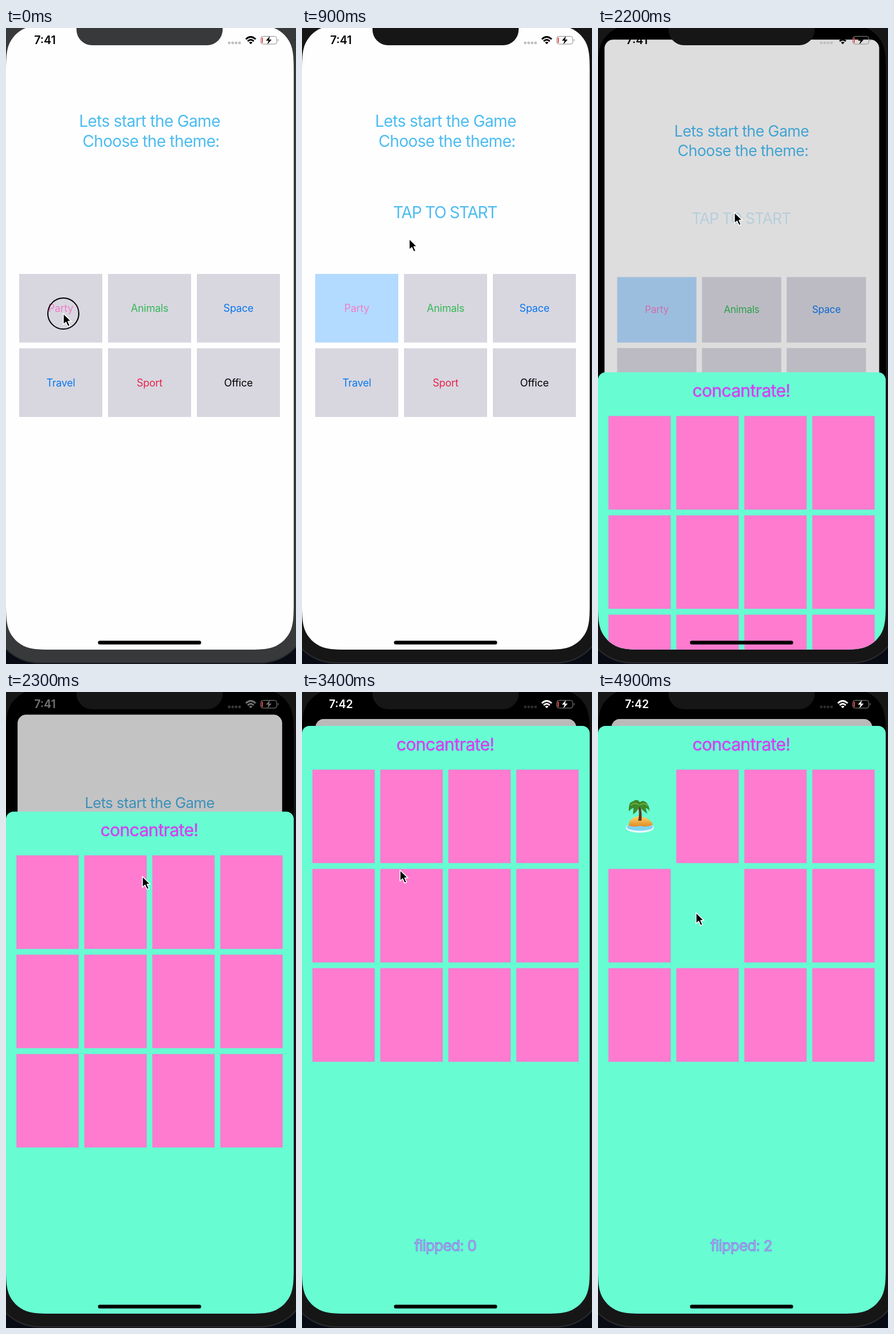
Recreate the animation shown at these times as an HTML page. Size 506x1107 px, loop 5 s.

```html
<!DOCTYPE html>
<html lang="en">
<head>
<meta charset="utf-8">
<title>Memory game</title>
<style>
html, body { margin: 0; width: 100%; height: 100%; overflow: hidden; background: #080b14; }
svg { display: block; width: 506px; height: 1107px; }
text { font-family: Inter, Roboto, sans-serif; text-anchor: middle; white-space: pre; }
.big { font-size: 28px; letter-spacing: -.024em; fill: #4bbcf0; }
.tap { letter-spacing: -.045em; }
.theme { font-size: 18px; letter-spacing: -.015em; }
.clock { font-size: 19.5px; font-weight: 600; }
.title { font-size: 30px; letter-spacing: -.022em; fill: #ee32f0; stroke: #9a6cf0; stroke-width: .6; }
.count { font-size: 26px; letter-spacing: -.032em; fill: #cfa3dc; stroke: #6f80ee; stroke-width: .9; }
</style>
</head>
<body>
<svg viewBox="0 0 506 1107">
  <defs>
    <clipPath id="screen"><path id="outline"/></clipPath>
    <linearGradient id="sand" x2="0" y2="1">
      <stop stop-color="#ffd76a"/><stop offset="1" stop-color="#e08a25"/>
    </linearGradient>
  </defs>
  <rect width="506" height="1107" fill="#080b14"/>
  <rect id="bezel" x="-24" y="-40" width="550" height="1145" rx="82" stroke="#2b2b2e" stroke-width="2"/>
  <g clip-path="url(#screen)">
    <rect y="-5" width="502" height="1087" fill="#000"/>
    <g id="home">
      <rect id="page" y="-5" width="502" height="1087" fill="#fffeff"/>
      <text class="big" x="250.5" y="172">Lets start the Game</text>
      <text class="big" x="253" y="207">Choose the theme:</text>
      <text class="big tap" id="tap" x="249.5" y="331">TAP TO START</text>
      <g id="themes"></g>
      <rect id="dim" y="-5" width="502" height="1087"/>
    </g>
    <g id="sheet">
      <rect width="502" height="1200" rx="13" fill="#68fcd3"/>
      <text class="title" x="250" y="43">concantrate!</text>
      <g id="cards"></g>
      <g id="palm">
        <ellipse cx="73" cy="177" rx="24.5" ry="9" fill="#eafafd"/>
        <ellipse cx="73" cy="176" rx="23" ry="6.5" fill="#7fd3f2"/>
        <path d="M53 173Q56 158 72 157Q90 159 96 172Q86 177 73 174Q61 177 53 173Z" fill="url(#sand)"/>
        <path d="M70 140Q73 152 70 165H76Q77 152 74 139Z" fill="#5f3a24"/>
        <path d="M72 136Q66 126 56 134Q53 140 54 149Q58 143 62 143L61 154Q68 150 72 141Q78 147 86 153L83 143Q88 144 90 149Q90 139 84 133Q78 128 73 133Q70 127 62 130Q68 131 72 136Z" fill="#3b8a2c"/>
        <path d="M72 138Q64 132 57 138M73 138Q80 132 87 139" fill="none" stroke="#7db642" stroke-width="1.5"/>
      </g>
      <text class="count" id="count" x="250" y="914"></text>
    </g>
    <g id="status">
      <text class="clock" id="clock" x="68" y="28"></text>
      <g id="dots"></g>
      <g id="wifi" fill="none" stroke-width="3">
        <path d="M418.5 19.5Q427 11.5 435.5 19.5M421.7 23Q427 18 432.3 23"/>
        <path d="M424 25.3Q427 22.8 430 25.3L427 28.3Z" stroke="none"/>
      </g>
      <rect x="444.5" y="14.5" width="28" height="13.5" rx="4" fill="none" stroke="#8c8b90"/>
      <path d="M474.5 19Q477 21.2 474.5 23.5Z" fill="#8c8b90"/>
      <rect x="446" y="16.5" width="2" height="9.5" rx="1" fill="#ee4540"/>
      <path id="bolt" d="M460.5 14L453.5 22H458L456 28.5L463.5 20.3H459Z"/>
    </g>
    <rect x="160.5" y="1066.5" width="180" height="6.5" rx="3.25"/>
  </g>
  <path id="notch" d="M123-5V3A27 27 0 0 0 150 30H351A27 27 0 0 0 378 3V-5Z"/>
  <g id="cursor">
    <circle id="ring" r="27" fill="none" stroke="#000" stroke-width="2"/>
    <path d="M0 0V19L4.6 15L8 22.5L11.5 21L8.2 13.6H14Z" stroke="#fff" stroke-width="1.5" stroke-linejoin="round"/>
  </g>
</svg>
<script>
const LOOP = 5000, STEP = 100;
const $ = id => document.getElementById(id);
const set = (id, attrs) => { for (const k in attrs) $(id).setAttribute(k, attrs[k]); };
const clamp = v => Math.max(0, Math.min(1, v));

function add(parent, tag, attrs, text) {
  const el = document.createElementNS('http://www.w3.org/2000/svg', tag);
  for (const k in attrs) el.setAttribute(k, attrs[k]);
  if (text) el.textContent = text;
  return $(parent).appendChild(el);
}

// rectangle with continuous-curvature corners
function smoothRect(x, y, w, h, r) {
  const curve = [
    [1.0885, 0], [.8684, 0], [.6315, .0749], [.3728, .1691], [.1691, .3728],
    [.0749, .6315], [0, .8684], [0, 1.0885], [0, 1.5287]
  ];
  const corners = [
    [x + w, y, -1, 0], [x + w, y + h, 0, -1], [x, y + h, 1, 0], [x, y, 0, 1]
  ];
  return corners.map(([cx, cy, ux, uy], i) => {
    const at = ([a, b]) => `${cx + r * (a * ux - b * uy)} ${cy + r * (a * uy - b * ux * (ux ? 1 : 0))}`;
    const turn = ([a, b]) => ux ? `${cx + r * a * ux} ${cy - r * b * ux}` : at([a, b]);
    const point = ux ? turn : ([a, b]) => `${cx + r * b * uy} ${cy + r * a * uy}`;
    return (i ? 'L' : 'M') + point([1.5287, 0]) + 'C' + curve.map(point).join(' ');
  }).join('') + 'Z';
}
set('outline', { d: smoothRect(0, -5, 502, 1087, 57) });

const themes = [
  ['Party', '#f07fc8'], ['Animals', '#34b857'], ['Space', '#0a78ee'],
  ['Travel', '#0a78ee'], ['Sport', '#e8234c'], ['Office', '#000']
];
const tiles = themes.map(([name, fill], i) => {
  const x = 23 + i % 3 * 155, y = 428 + Math.floor(i / 3) * 129.5;
  const tile = add('themes', 'rect', { x, y, width: 145, height: 119.5, fill: '#d8d7e0' });
  add('themes', 'text', { class: 'theme', x: x + 72.5, y: y + 66, fill }, name);
  return tile;
});

const cards = Array.from({ length: 12 }, (_, i) => add('cards', 'rect', {
  x: 18.3 + i % 4 * 118.6, y: 76.3 + Math.floor(i / 4) * 172.8,
  width: 108.4, height: 162.4, fill: '#ff7bd0', stroke: '#dc8fd0', 'stroke-width': .6
}));

for (let i = 0; i < 4; i++) add('dots', 'circle', { cx: 389.5 + i * 6, cy: 26, r: 2.4 });

// time, x, y of the pointer tip
const path = [
  [0, 100, 497], [300, 100, 497], [600, 130, 440], [900, 187, 367], [1300, 238, 321],
  [3000, 238, 321], [3400, 171, 310], [3700, 84, 250], [4100, 84, 250],
  [4600, 171, 384], [LOOP, 171, 384]
];
const presses = [[0, 100], [1900, 2000], [3800, 3900], [4700, 4800]];
const within = (t, [from, to]) => t >= from && t < to;

function pointer(t) {
  const i = path.findIndex((p, n) => n && t <= p[0]);
  const a = path[i - 1], b = path[i], k = (t - a[0]) / (b[0] - a[0]);
  return [a[1] + (b[1] - a[1]) * k, a[2] + (b[2] - a[2]) * k];
}

// critically damped rise of the sheet
function rise(t) {
  const w = Math.max(0, t - 2110) * .0181;
  return 1 - (1 + w) * Math.exp(-w);
}

function grey(from, to, k) {
  const v = Math.round(from + (to - from) * k);
  return `rgb(${v},${v},${v})`;
}

function draw(t) {
  const shell = t < 100 ? '#38393b' : '#171617';
  set('bezel', { fill: shell });
  set('notch', { fill: shell });

  tiles[0].setAttribute('fill', t < 200 ? '#d8d7e0' : '#b3daff');
  set('tap', { opacity: t < 200 ? 0 : within(t, [1900, 2300]) ? .25 : 1 });

  const p = rise(t), s = 1 - .094 * p, rx = 16 * clamp(p * 4);
  set('home', { transform: `translate(${251 * (1 - s)} ${-5 + 52 * p}) scale(${s}) translate(0 5)` });
  set('page', { rx });
  set('dim', { opacity: .27 * p, rx });
  set('sheet', { transform: `translate(0 ${59 + 1048 * (1 - p)})` });

  const ink = clamp((t - 2200) / 220), tone = grey(0, 255, ink);
  set('clock', { fill: tone });
  set('wifi', { stroke: tone });
  $('wifi').lastElementChild.setAttribute('fill', tone);
  set('bolt', { fill: tone });
  set('dots', { fill: grey(192, 44, clamp(ink * 2)) });
  $('clock').textContent = t < 3100 ? '7:41' : '7:42';

  const flips = (t >= 4000) + (t >= 4900);
  cards[0].setAttribute('opacity', t < 4000 ? 1 : 0);
  cards[5].setAttribute('opacity', t < 4900 ? 1 : 0);
  set('palm', { opacity: clamp((t - 4000) / 200) });
  $('count').textContent = 'flipped: ' + flips;

  set('cursor', { transform: `translate(${pointer(t)})` });
  set('ring', { opacity: presses.some(r => within(t, r)) ? 1 : 0 });
}

function tick() {
  draw(Math.floor(performance.now() % LOOP / STEP) * STEP);
  requestAnimationFrame(tick);
}
tick();
</script>
</body>
</html>
```
